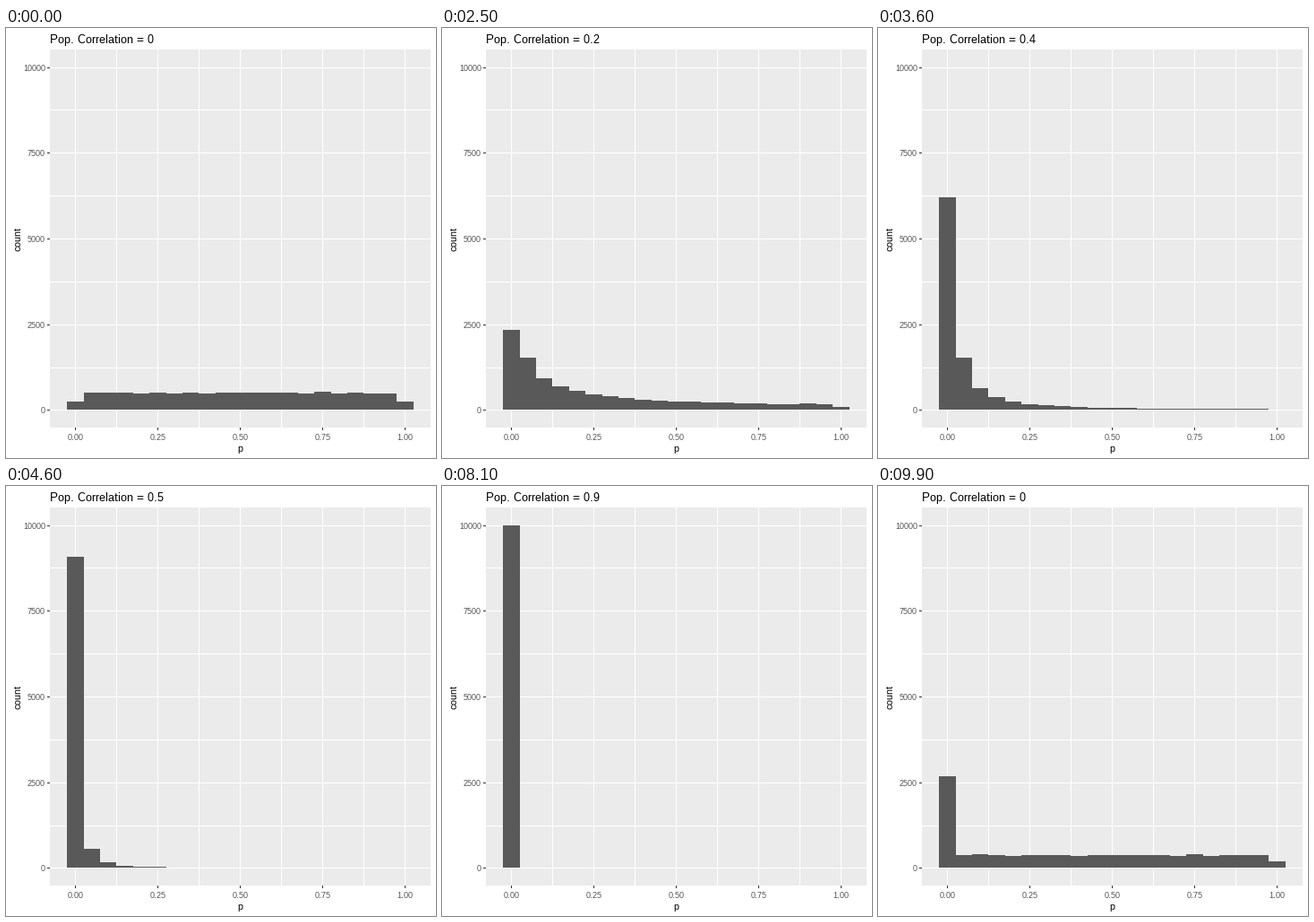
A matplotlib script for the animation above (10 s loop, 480 px wide and 480 px high).

```python
import math

import matplotlib.pyplot as plt
import numpy as np
from matplotlib.animation import FuncAnimation
from matplotlib.patches import Rectangle

SIZE, DPI = 480, 96
FRAMES, INTERVAL = 100, 100
STARTS = [6, *range(16, 98, 9)]   # first frame of each transition
STEPS = 4
TRIALS, SAMPLE = 10000, 45
BINS, WIDTH = 21, 0.05
NOISE = 0.6

# Grid-fitted glyphs with whole-pixel advances
plt.rcParams.update({
    "font.family": "Liberation Sans",
    "text.hinting": "native",
    "text.hinting_factor": 1,
})


def snap(v):
    return math.floor(v + 0.5)


def px(p):
    return snap(77.4 + 368 * p)


def py(count):
    return snap(426.48 - 0.03829 * count)


def p_histogram(rho):
    """Expected p-value counts of a correlation test (Fisher z)."""
    mu = math.atanh(min(rho, 0.999)) * math.sqrt(SAMPLE - 3)
    z_grid = np.linspace(6, 0, 3001)
    p_grid = [math.erfc(z / math.sqrt(2)) for z in z_grid]
    edges = np.clip((np.arange(BINS + 1) - 0.5) * WIDTH, 0, 1)

    def share_beyond(z):
        return 0.5 * (math.erfc((z - mu) / math.sqrt(2))
                      + math.erfc((z + mu) / math.sqrt(2)))

    cdf = np.array([share_beyond(z) for z in np.interp(edges, p_grid, z_grid)])
    cdf[0] = 0
    return TRIALS * np.diff(cdf)


def sampled(counts, rng):
    """Add binomial-like sampling noise."""
    spread = np.sqrt(np.maximum(counts * (1 - counts / TRIALS), 0))
    return np.clip(counts + NOISE * spread * rng.standard_normal(BINS), 0, TRIALS)


rng = np.random.default_rng(4)
STATES = [sampled(p_histogram(k / 10), rng) for k in range(11)]

fig = plt.figure(figsize=(SIZE / DPI, SIZE / DPI), dpi=DPI, facecolor="white")
ax = fig.add_axes([0, 0, 1, 1])
ax.set_xlim(0, SIZE)
ax.set_ylim(SIZE, 0)
ax.axis("off")


def box(left, top, right, bottom, color, z=1):
    patch = Rectangle((left, top), right - left, bottom - top,
                      facecolor=color, linewidth=0, antialiased=False, zorder=z)
    return ax.add_patch(patch)


def label(x, y, text, size, color="black", **kw):
    return ax.text(x, y, text, fontsize=size * 72 / DPI, color=color,
                   va="baseline", zorder=5, **kw)


LEFT, TOP, RIGHT, BOTTOM = 49, 24, 474, 446
GREY, TICK = "#4D4D4D", "#333333"

box(LEFT, TOP, RIGHT, BOTTOM, "#EBEBEB")
for i in range(9):
    x, y = px(i / 8), py(1250 * i)
    box(x, TOP, x + 1, BOTTOM, "white")
    box(LEFT, y, RIGHT, y + 1, "white")
    if i % 2 == 0:
        box(x, BOTTOM, x + 1, BOTTOM + 3, TICK)
        box(LEFT - 3, y, LEFT, y + 1, TICK)
        label(x + 0.5, 460, f"{i / 8:.2f}", 9, GREY, ha="center")
        label(44, y + 4, str(1250 * i), 9, GREY, ha="right")

label(261.5, 473, "p", 11, ha="center")
label(16, 235.5, "count", 11, ha="center", rotation=90, rotation_mode="anchor")
title = label(LEFT, 17, "", 13, ha="left")

BASE = py(0)
bars = [box(px((i - 0.5) * WIDTH), BASE, px((i + 0.5) * WIDTH), BASE,
            "#595959", 3) for i in range(BINS)]


def update(frame):
    k = sum(start <= frame for start in STARTS) - 1
    if k < 0:
        counts, shown = STATES[0], 0
    else:
        t = min((frame - STARTS[k] + 1) / STEPS, 1)
        following = (k + 1) % len(STATES)
        counts = (1 - t) * STATES[k] + t * STATES[following]
        shown = following if t > 0.5 else k
    for bar, count in zip(bars, counts):
        top = py(count)
        bar.set_y(top)
        bar.set_height(BASE - top)
        bar.set_visible(top < BASE)
    title.set_text(f"Pop. Correlation = {shown / 10:g}")
    return [*bars, title]


anim = FuncAnimation(fig, update, frames=FRAMES, interval=INTERVAL,
                     init_func=lambda: update(0), repeat=True, repeat_delay=0)

plt.show()
```
